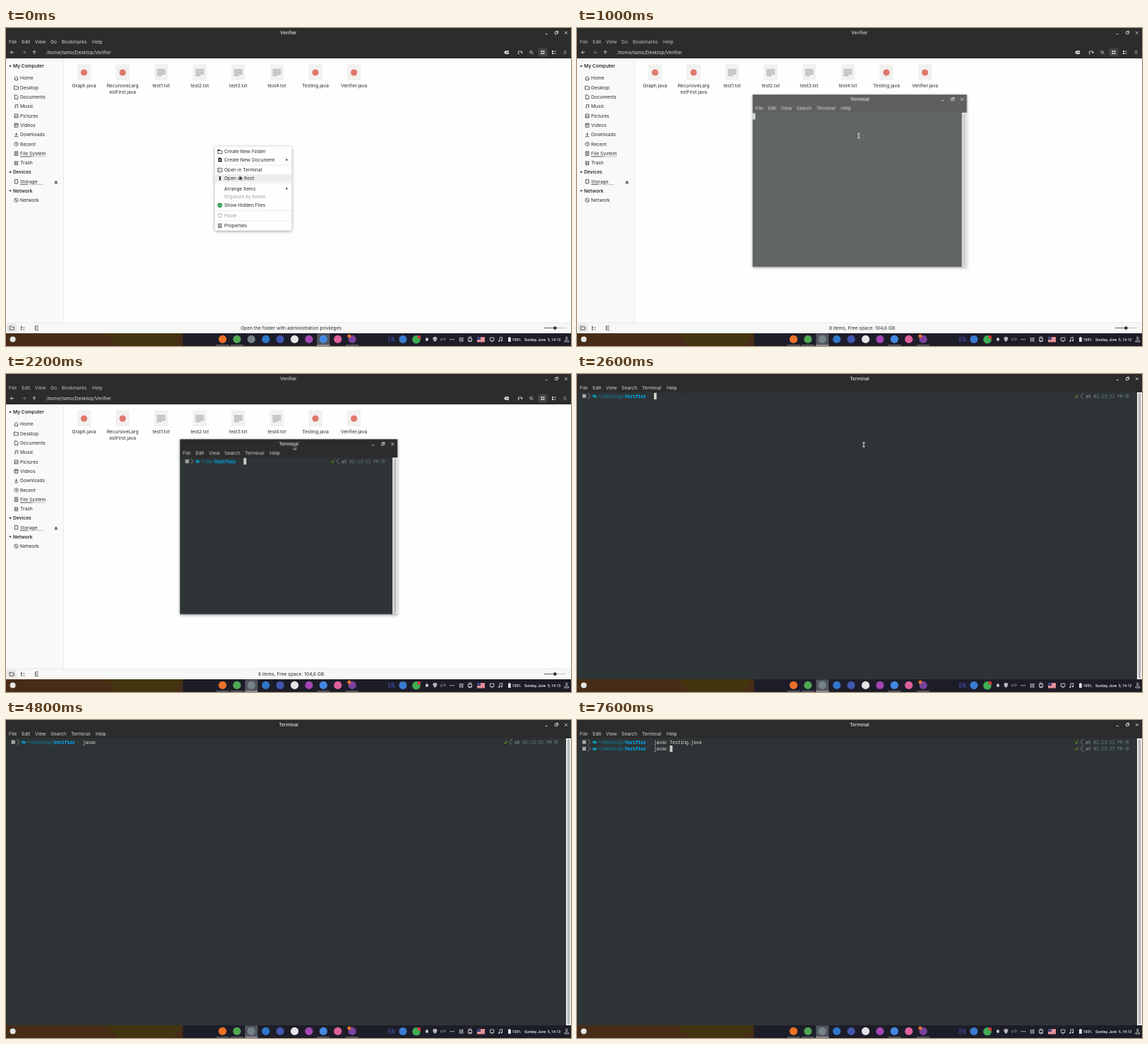
These frames come from a looping animation (800 by 450 pixels, 8000 ms). An HTML page:

```html
<!DOCTYPE html>
<html lang="en">
<head>
<meta charset="utf-8">
<title>Desktop session</title>
<style>
html, body { margin: 0; width: 100%; height: 100%; overflow: hidden; background: #fefefe; }
svg { display: block; width: 800px; height: 450px; }
text { font: 6.67px Inter, sans-serif; fill: #2b2b2b; white-space: pre; }
.b { font-weight: 600; }
.mid { text-anchor: middle; }
.lt { fill: #d6d6d4; }
.ttl { fill: #e4e4e2; font-weight: 500; text-anchor: middle; }
.dim { fill: #a3a3a3; }
.tray { font: 500 5.15px Roboto, sans-serif; fill: #e8e8ea; }
.lang { font: 8.2px "DejaVu Sans Mono", monospace; fill: #4552b4; }
.mono { font: 6.8px "Noto Sans Mono", monospace; letter-spacing: -.33px; fill: #d3d7cf; }
.hi { fill: #00a8f0; font-weight: 700; }
.path { fill: #0a83a8; }
.at { fill: #9aa3a3; }
.time { fill: #667a7b; }
.ic { fill: none; stroke: #333; stroke-width: .8; }
.li { fill: none; stroke: #d6d6d4; stroke-width: .9; }
.soft { filter: drop-shadow(0 1px 2px rgba(0,0,0,.4)); }

[class*="t-"] { animation: 8s step-end infinite; }
.t-menu { animation-name: menu; }
.t-hover { animation-name: hover; }
.t-s1 { animation-name: s1; }
.t-s2 { animation-name: s2; }
.t-s3 { animation-name: s3; }
.t-blur { animation-name: blur; }
.t-file { animation-name: file; }
.t-unfile, .t-term { animation-name: term; }
.t-launch { animation-name: launch; }
.t-win { animation-name: win; transform-origin: 154px 124px; }
.t-ready { animation-name: ready; }
.t-wcaret { animation-name: wcaret; }
.t-full { animation-name: full; }
.t-row1 { animation-name: row1; }
.t-blink { animation-name: blink; }
.t-wait { animation-name: wait; }
.t-prompt { animation-name: prompt; }
.t-row2 { animation-name: row2; }
.t-arrow { animation-name: arrow; }
.t-beam { animation-name: beam; }

@keyframes menu { 0% { opacity: 1 } 5%, 100% { opacity: 0 } }
@keyframes hover { 0% { transform: none } 2.5%, 100% { transform: translateY(-11.6px) } }
@keyframes s1 { 0% { opacity: 1 } 2.5%, 100% { opacity: 0 } }
@keyframes s2 { 0% { opacity: 0 } 2.5% { opacity: 1 } 5%, 100% { opacity: 0 } }
@keyframes s3 { 0% { opacity: 0 } 5%, 100% { opacity: 1 } }
@keyframes blur { 0% { opacity: 1 } 12.5%, 100% { opacity: .88 } }
@keyframes file { 0% { opacity: 1 } 12.5%, 100% { opacity: 0 } }
@keyframes term { 0% { opacity: 0 } 12.5%, 100% { opacity: 1 } }
@keyframes launch { 0% { opacity: 0 } 7.5%, 100% { opacity: 1 } }
@keyframes win {
  0% { opacity: 0; transform: scale(.985) }
  12.5% { opacity: .76; transform: scale(.985) }
  15% { opacity: 1; transform: none }
  32.5%, 100% { opacity: 0; transform: none }
}
@keyframes ready { 0% { opacity: 0 } 17.5%, 100% { opacity: 1 } }
@keyframes wcaret {
  0% { opacity: 1; transform: none }
  17.5% { opacity: 1; transform: translateX(90px) }
  25% { opacity: 0; transform: translateX(90px) }
  27.5%, 100% { opacity: 1; transform: translateX(90px) }
}
@keyframes full { 0% { opacity: 0 } 32.5%, 100% { opacity: 1 } }
@keyframes row1 {
  0% { transform: none }
  45% { transform: translateX(3.75px) }
  47.5% { transform: translateX(7.5px) }
  50% { transform: translateX(15px) }
  52.5% { transform: translateX(22.5px) }
  67.5% { transform: translateX(26.25px) }
  70% { transform: translateX(33.75px) }
  72.5%, 100% { transform: translateX(71.25px) }
}
@keyframes blink {
  0% { opacity: 1 } 37.5% { opacity: 0 } 45% { opacity: 1 }
  60% { opacity: 0 } 67.5% { opacity: 1 } 80%, 100% { opacity: 0 }
}
@keyframes wait { 0% { opacity: 0 } 80% { opacity: 1 } 85%, 100% { opacity: 0 } }
@keyframes prompt { 0% { opacity: 0 } 85%, 100% { opacity: 1 } }
@keyframes row2 {
  0% { transform: none }
  87.5% { transform: translateX(3.75px) }
  90% { transform: translateX(11.25px) }
  92.5% { transform: translateX(15px) }
  95%, 100% { transform: translateX(22.5px) }
}
@keyframes arrow {
  0% { opacity: 1; transform: translate(330.5px, 208.5px) }
  2.5% { opacity: 1; transform: translate(338px, 200px) }
  7.5% { opacity: 1; transform: translate(350px, 188px) }
  12.5% { opacity: 0; transform: none }
  25% { opacity: 1; transform: translate(406.5px, 100px) }
  32.5%, 100% { opacity: 0; transform: none }
}
@keyframes beam {
  0% { opacity: 0; transform: none }
  12.5% { opacity: 1; transform: translate(399px, 152.5px) }
  20% { opacity: 1; transform: translate(401px, 142px) }
  22.5% { opacity: 1; transform: translate(405px, 122px) }
  25% { opacity: 0; transform: none }
  32.5% { opacity: 1; transform: translate(406px, 100px) }
  45%, 100% { opacity: 0; transform: none }
}
</style>
</head>
<body>
<svg id="stage" viewBox="0 0 800 450"></svg>
<script>
const CH = 3.75, ROW = 9.4, BODY = '#2e3436', BAR = '#2c2c2c';

const text = (x, y, s, c = '') => `<text x="${x}" y="${y}" class="${c}">${s}</text>`;
const rect = (x, y, w, h, fill, more = '') =>
  `<rect x="${x}" y="${y}" width="${w}" height="${h}" fill="${fill}" ${more}/>`;
const dot = (x, y, r, fill) => `<circle cx="${x}" cy="${y}" r="${r}" fill="${fill}"/>`;
const path = (d, c = 'ic', more = '') => `<path d="${d}" class="${c}" ${more}/>`;
const fill = (d, color) => `<path d="${d}" fill="${color}"/>`;
const at = (x, y, s) => `<g transform="translate(${x} ${y})">${s}</g>`;
const show = (c, s) => `<g class="t-${c}">${s}</g>`;

const ring = 'M3 .3a2.7 2.7 0 1 1-.01 0z';
const folder = 'M0 .8h2.4l.8 .9H6V5.6H0z';
const icons = {
  Home: 'M0 3.2L3 .3L6 3.2M1 2.6V5.8H5V2.6',
  Desktop: folder,
  Documents: 'M.8 .2H3.8L5.3 1.7V5.8H.8z',
  Music: 'M1.8 5V.6H5.2V4.4M.6 5h1.2M4 4.4h1.2',
  Pictures: 'M.6 .6H5.4V5.6H.6zM.6 4.8L2.4 3L3.4 4L4.4 3L5.4 4',
  Videos: 'M.6 .4H5.4V5.6H.6zM.6 1.9H5.4M2.5 3v1.6',
  Downloads: 'M3 0V4M1.2 2.3L3 4.1L4.8 2.3M.3 5.7H5.7',
  Recent: ring + 'M3 1.4V3.2L4.3 3.9',
  'File System': 'M.8 .2H5.2V5.8H.8zM2 1.7H4M2 3H4M2 4.4H4',
  Trash: 'M.2 1H5.8M1 1V5.7H5V1M2.4 2.4V4.4M3.6 2.4V4.4',
  Storage: 'M.9 .2H5.1V5.8H.9z',
  Network: ring + 'M1.2 1.2L4.8 4.8'
};

function header(w, h, title, menus) {
  const items = menus.map(([x, s]) => text(x, 22.3, s, 'lt')).join('');
  return rect(0, 0, w, h, BAR) + `<g class="${w == 800 && h > 30 ? 't-blur' : ''}">` +
    text(w / 2, 9.1, title, 'ttl') + items +
    path(`M${w - 36.5} 8.6h3.4`, 'li') +
    path(`M${w - 22.6} 5.4h3.2v3.2h-3.2zM${w - 21.4} 4.4h3.2v3.2`, 'li', 'stroke-width=".7"') +
    path(`M${w - 9} 4.8l4 4m0-4l-4 4`, 'li') + '</g>';
}

function place(name, y) {
  return at(11.5, y - 3, path(icons[name])) + text(20, y + 2.4, name);
}

function sidebar() {
  const names = Object.keys(icons).slice(0, 10);
  const heads = [['My Computer', 54], ['Devices', 204], ['Network', 230.4]];
  return rect(0, 43, 82, 374, '#f9f9f8') + rect(81.5, 43, .6, 374, '#e2e2e0') +
    heads.map(([s, y]) => fill(`M4 ${y - 1}h4l-2 2.4z`, '#333') + text(10, y + 2.4, s, 'b')).join('') +
    names.map((n, i) => place(n, 71 + i * 13.33)).join('') +
    place('Storage', 217.2) + place('Network', 243.6) +
    rect(20, 181.6, 36.5, .7, '#aaa') + rect(20, 181.6, 17, .7, '#444') +
    rect(20, 221.2, 32.5, .7, '#aaa') + rect(20, 221.2, 10, .7, '#444') +
    fill('M68.6 218.6l2.2-2.6l2.2 2.6zM68.6 219.3h4.4v1h-4.4z', '#333');
}

function files() {
  const names = ['Graph.java', 'RecursiveLarg', 'test1.txt', 'test2.txt', 'test3.txt',
    'test4.txt', 'Testing.java', 'Verifier.java'];
  return names.map((n, i) => {
    const x = 110.5 + i * 54.6;
    const mark = n.endsWith('txt')
      ? [12, 12, 12, 12, 7].map((w, k) => rect(x - 6, 58.4 + k * 2.1, w, 1, '#9b9b9b')).join('')
      : dot(x, 63, 4.6, '#e0776c');
    return rect(x - 9.7, 51.3, 19.4, 22.8, '#f1f1f0', 'rx="1.5"') + mark + text(x, 84.2, n, 'mid');
  }).join('') + text(165.1, 93.3, 'estFirst.java', 'mid');
}

function toolbar() {
  const cell = (x, y) => rect(x, y, 2, 2, '#e4e4e2');
  return path('M11 34.5H6.5M8.6 32.2L6.3 34.5L8.6 36.8', 'li') +
    path('M23 34.5H27.5M25.4 32.2L27.7 34.5L25.4 36.8', 'li', 'opacity=".45"') +
    path('M40 37V32.3M37.7 34.4L40 32.1L42.3 34.4', 'li') +
    text(57, 36.8, '/home/tamo/Desktop/Verifier', 'lt') +
    fill('M705 34.5l2.3-2.6h4.6v5.2h-4.6z', '#d6d6d4') +
    path('M708.4 33.4l2.2 2.2m0-2.2l-2.2 2.2', 'ic') +
    path('M727 36.4h-1.6v-3.4h5v2.4m-1.5-1.2l1.5 1.6l1.5-1.6', 'li') +
    path('M743.4 32.2a1.8 1.8 0 1 1-.01 0zM744.8 35.2l2 2', 'li') +
    rect(753.5, 28.5, 13, 12, '#444', 'rx="2"') +
    cell(757.4, 32) + cell(760.4, 32) + cell(757.4, 35) + cell(760.4, 35) +
    cell(773, 32) + cell(773, 35) + path('M776 33h2.6M776 36h2.6', 'li') +
    path('M789.6 32.6h3.8M789.6 34.5h3.8M789.6 36.4h3.8', 'li', 'opacity=".6"');
}

function status() {
  const line = s => text(403.6, 427, s, 'mid');
  return rect(0, 417, 800, 15, '#f7f7f6') + rect(0, 416.7, 800, .6, '#dcdcda') +
    rect(1.5, 418.5, 13.5, 12, '#e6e6e4', 'rx="1.5"') + at(5.2, 421.4, path(folder)) +
    path('M21.5 421.5v6M21.5 423.5h1.6M21.5 426.8h1.6M24.4 424h2M24.4 427h2') +
    path('M46 421.8h-4.6v5.6H46M42.4 424.6h3.4') +
    show('s1', line('Open the folder with administration privileges')) +
    show('s2', line('Open terminal in this folder')) +
    show('s3', line('8 items, Free space: 104,6 GB')) +
    rect(762, 424.2, 31, .8, '#b5b5b3') + rect(762, 424.2, 15, .8, '#444') + dot(777.4, 424.6, 2.3, '#333');
}

function contextMenu() {
  const rows = [[175, 'Create New Folder'], [186.5, 'Create New Document'], [201, 'Open in Terminal'],
    [212.6, 'Open as Root'], [227.2, 'Arrange Items'], [239, 'Organize by Name', 'dim'],
    [250.8, 'Show Hidden Files'], [265.2, 'Paste', 'dim'], [279.8, 'Properties']];
  return `<g class="soft">${rect(295.6, 167.7, 109, 119, '#fefefe', 'rx="2.5"')}</g>` +
    show('hover', rect(296.4, 207, 107.4, 11.2, '#ececeb')) +
    [193.8, 219.8, 258.2, 272.6].map(y => rect(296, y, 108, .6, '#dededc')).join('') +
    rows.map(([y, s, c]) => text(309, y + 2.3, s, c)).join('') +
    [186.5, 227.2].map(y => fill(`M396.6 ${y - 2}l2.4 2l-2.4 2z`, '#333')).join('') +
    at(300, 172, path(folder) + fill('M0 0h2.6v2H0z', '#222')) +
    fill('M300.6 183.4h3.2l1.8 1.8v4.4h-5z', '#222') + rect(302, 186, 2, 1.6, '#fff') +
    path('M299.8 198.3h6v5.4h-6zM301 200l1.2 1l-1.2 1') +
    fill('M301.5 210h3l-.7 2.6l.7 2.6h-3l.7-2.6z', '#222') +
    dot(302.8, 250.8, 3.4, '#2e9e4f') + path('M301.2 250.9l1.2 1.2l2.2-2.5', 'li') +
    path('M300.6 262.9h4.6v5h-4.6zM302 262.4h1.8', 'ic', 'opacity=".4"') +
    path('M299.8 277.2h6M299.8 279h6M299.8 280.8h6M299.8 282.4h6');
}

function taskbar() {
  const apps = ['#ee7128', '#50a852', '#75828a', '#2f77c9', '#4257ae', '#e6e4e6',
    '#a545b4', '#4389e2', '#e0609c', '#7c429f'];
  const mid = i => 306.6 + i * 20.4;
  const mark = i => rect(mid(i) - 9, 448.4, 18, 1, '#85858f');
  const tile = i => rect(mid(i) - 9, 432.5, 18, 17.5, '#53555f') + rect(mid(i) - 9, 448.4, 18, 1.2, '#a9a9b2');
  const grid = [0, 1, 2].map(r => [0, 1, 2].map(c =>
    rect(641.8 + c * 2.1, 438 + r * 2.1, 1.4, 1.4, '#ddd')).join('')).join('');
  return rect(0, 432, 800, 18, '#1d1d29') + rect(0, 432, 250.5, 18, '#472d17') +
    fill('M143 432H250L235 450H158z', '#43350f') + dot(9.6, 440.6, 4, '#e4e4e4') +
    [0, 1, 9].map(mark).join('') + show('launch', mark(2)) + mark(7) +
    show('file', tile(7)) + show('term', tile(2)) +
    apps.map((c, i) => dot(mid(i), 440.4, 5.6, c)).join('') +
    dot(486, 436, 2.5, '#e8742c') + text(540.8, 443.6, 'EN', 'lang') +
    dot(562, 440.5, 5.5, '#3a7bd0') + dot(581, 440.8, 5.8, '#3fae55') + dot(585, 437.4, 2.3, '#e0323a') +
    rect(594.3, 438.6, 3.4, 4, '#d8d8dc') +
    fill('M604.4 438l3-1.2l3 1.2c0 3-1 4.8-3 6c-2-1.2-3-3-3-6z', '#b5b5ba') +
    path('M617 442.6a1.6 1.6 0 1 1 1.2-2.6l1.8 1.4a1.5 1.5 0 1 0 0-2.6', 'li', 'opacity=".7"') +
    [629.4, 631.8, 634.2].map(x => dot(x, 440.8, .8, '#ddd')).join('') + grid +
    path('M654.4 439.2h5.2v3.4h-5.2zM655.4 439v-1.8h3.2v1.8M655.4 442v1.8h3.2v-1.8', 'li') +
    rect(667, 437, 11, 7.4, '#f0eeee') +
    [0, 1, 2, 3].map(i => rect(667, 437 + i * 2.1, 11, 1.1, '#d0434c')).join('') +
    rect(667, 437, 5, 4, '#39457f') +
    path('M685.4 438.2h5.4v4.2h-5.4zM687 443.8h2.2', 'li') +
    path('M699 443v-4.8l3.6-.6v4.6', 'li') + dot(698.2, 443, 1.1, '#ddd') + dot(701.8, 442.3, 1.1, '#ddd') +
    rect(711, 438, 3.8, 6, '#e4e4e6') + rect(712, 437.2, 1.8, 1, '#e4e4e6') +
    text(716.6, 442.7, '100%', 'tray') + text(734, 442.7, 'Sunday, June  5, 14:13', 'tray') +
    path('M793.8 437.2a1.4 1.4 0 1 1-.01 0zM790.8 444c.4-3.6 5.6-3.6 6 0z', 'li');
}

const caret = (col, row = 0) => rect(col * CH + .2, 26.7 + row * ROW, 3.7, 9.2, '#d3d7cf');

// left and right prompt; base is the column where the right part begins
function prompt(row, dir, base, time) {
  const y = 33.7 + row * ROW, c = 31.3 + row * ROW, x = base * CH;
  const name = (8 + 1 + dir.length) * CH;
  return rect(7.6, c - 2.6, 5.2, 5.2, '#a3a8a6') +
    path(`M15.2 ${c - 4.2}l3.8 4.2l-3.8 4.2`, 'li', 'opacity=".5"') +
    fill(`M22.4 ${c - 2}h2l.6 .7h2.6v3.3h-5.2z`, '#0a97bd') +
    text(8 * CH, y, '~', 'mono hi') + text(9 * CH, y, dir, 'mono path') + text(name, y, 'Verifier', 'mono hi') +
    `<path d="M${x + .9} ${c + .4}l1.1 1.6l2.2-3.8" fill="none" stroke="#76b50a" stroke-width="1"/>` +
    path(`M${x + 11.8} ${c - 4.2}l-3.8 4.2l3.8 4.2`, 'li', 'opacity=".5"') +
    text(x + 4 * CH, y, 'at', 'mono at') + text(x + 7 * CH, y, time, 'mono time') +
    `<path d="M${x + 74} ${c - 2.2}a2.2 2.2 0 1 1-.01 0zm0 1v1.4h1" fill="none" stroke="#78898a" stroke-width=".7"/>`;
}

function terminal(w, h, body) {
  return rect(0, 0, w, h, BODY) +
    header(w, 26, 'Terminal', [[4, 'File'], [22.3, 'Edit'], [41, 'View'], [63, 'Search'], [92, 'Terminal'], [127, 'Help']]) +
    rect(w - 7, 26, 7, h - 26, '#f6f6f5') + rect(w - 5.4, 27, 3.8, h - 28, '#b9bab9', 'rx="1.9"') + body;
}

// a cover hides the part of the line that is not typed yet
function typed(row, s, cls, cursor) {
  const x = 29 * CH;
  return text(x, 33.7 + row * ROW, s, 'mono') +
    show(cls, rect(x, 26.4 + row * ROW, 90, 9.4, BODY) + cursor);
}

const small = prompt(0, '/De/', 57, '02:13:51 PM');
const big = typed(0, 'javac Testing.java', 'row1', show('blink', caret(29))) +
  prompt(0, '/Desktop/', 188, '02:13:51 PM') +
  show('wait', caret(0, 1)) +
  show('prompt', typed(1, 'javac', 'row2', caret(29, 1)) + prompt(1, '/Desktop/', 188, '02:13:57 PM'));

document.getElementById('stage').innerHTML =
  rect(0, 0, 800, 450, '#fefefe') +
  header(800, 43, 'Verifier', [[4, 'File'], [22.3, 'Edit'], [41, 'View'], [63, 'Go'], [79, 'Bookmarks'], [122, 'Help']]) +
  toolbar() + sidebar() + files() + status() + taskbar() +
  show('menu', contextMenu()) +
  at(246.3, 92.3, show('win', `<g class="soft">${terminal(308, 247.6,
    show('ready', small) + show('wcaret', caret(0)))}</g>`)) +
  show('full', terminal(800, 432, big)) +
  show('arrow', `<path d="M0 0V7L1.7 5.5L2.9 8L4 7.5L2.9 5.1H5z" fill="#1c1c1c" stroke="#fff" stroke-width=".5"/>`) +
  show('beam', '<path d="M-1.8 -3H1.8M0 -3V3M-1.8 3H1.8" fill="none" stroke="#e6e6e6" stroke-width="1"/>');
</script>
</body>
</html>
```
